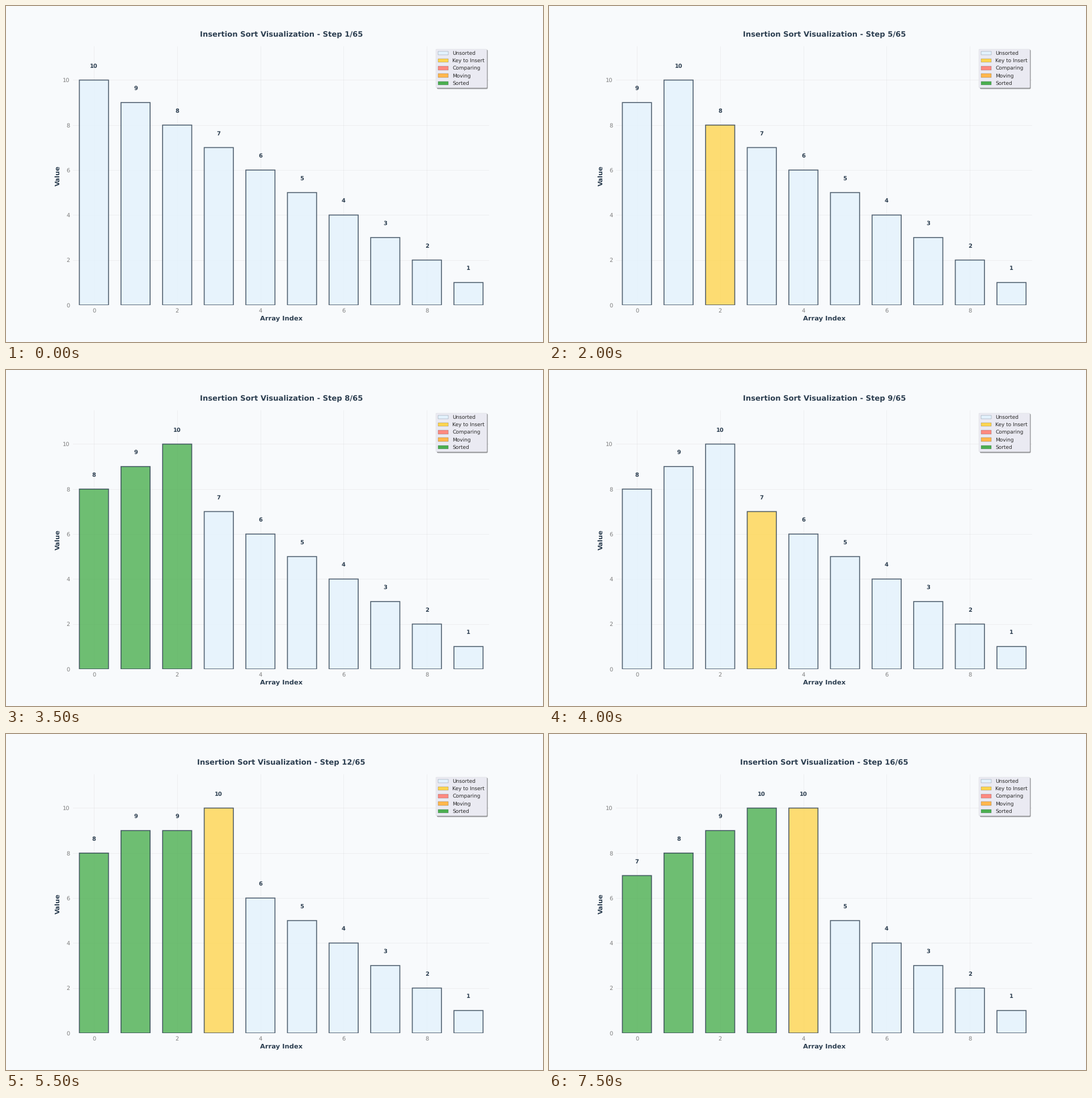
A matplotlib script for the animation above (8 s loop, 947 by 592 pixels).

```python
from itertools import islice

import matplotlib.pyplot as plt
from matplotlib.animation import FuncAnimation
from matplotlib.patches import Patch

W, H = 947, 592
DPI = W / 16
FRAMES, INTERVAL, TOTAL = 16, 500, 65

BG, INK, GRAY = "#F8FAFC", "#2C3E50", "#808080"
COLORS = {
    "Unsorted": "#E3F2FD",
    "Key to Insert": "#FFD54F",
    "Comparing": "#FF8A80",
    "Moving": "#FFB74D",
    "Sorted": "#4CAF50",
}

plt.rcParams.update({
    "font.family": "DejaVu Sans",
    "text.hinting": "none",
    "patch.linewidth": 0.3,
    "axes.axisbelow": True,
})


def insertion_steps(values):
    """Yield (values, states) for every visible step of the sort."""
    a = list(values)
    n = len(a)

    def snap(done=0, **marked):
        states = ["Sorted" if k < done else "Unsorted" for k in range(n)]
        if marked:
            states[marked["at"]] = marked["state"]
        return a[:], states

    yield snap()
    for i in range(1, n):
        key, j = a[i], i - 1
        yield snap(at=i, state="Key to Insert")
        yield snap(i, at=i, state="Moving")
        while j >= 0 and a[j] > key:
            a[j + 1] = a[j]
            j -= 1
            if j >= 0 and a[j] > key:
                yield snap(i, at=i, state="Key to Insert")
        a[j + 1] = key
        yield snap(i + 1)
    yield snap(n)


steps = list(islice(insertion_steps(range(10, 0, -1)), FRAMES))

# The tiny surplus keeps the pixel height from truncating to 591.
fig, ax = plt.subplots(figsize=(16, (H + 1e-6) / DPI), dpi=DPI, facecolor=BG)
ax.set_facecolor(BG)
ax.set_xlim(-0.5, 9.5)
ax.set_ylim(0, 11.5)
ax.set_xticks(range(0, 10, 2))
ax.set_yticks(range(0, 11, 2))
ax.tick_params(length=0, pad=7, labelsize=12, labelcolor=GRAY)
ax.grid(True, color="#CCCCCC", alpha=0.3, linewidth=1)
ax.spines[:].set_visible(False)
ax.set_xlabel("Array Index", fontsize=14, fontweight="bold", color=INK)
ax.set_ylabel("Value", fontsize=14, fontweight="bold", color=INK)
title = ax.set_title("", fontsize=16, fontweight="bold", color=INK, pad=20)

bars = ax.bar(range(10), steps[0][0], width=0.7, edgecolor=INK,
              linewidth=2, alpha=0.8, snap=False)
labels = [ax.text(k, 0, "", ha="center", va="bottom", fontsize=12,
                  fontweight="bold", color=INK) for k in range(10)]

ax.legend(
    handles=[Patch(facecolor=c, edgecolor=INK, label=name)
             for name, c in COLORS.items()],
    loc="upper right", fontsize=11, frameon=True, fancybox=True, shadow=True,
    framealpha=1, facecolor="#EAEAF2", edgecolor="0.8", labelcolor="0.15",
)


def draw(frame):
    values, states = steps[frame]
    for bar, label, value, state in zip(bars, labels, values, states):
        bar.set_height(value)
        bar.set_facecolor(COLORS[state])
        label.set_text(str(value))
        label.set_y(value + 0.5)
    title.set_text(f"Insertion Sort Visualization - Step {frame + 1}/{TOTAL}")
    return [*bars, *labels, title]


anim = FuncAnimation(fig, draw, frames=FRAMES, interval=INTERVAL,
                     repeat=True, repeat_delay=0, blit=False)
plt.show()
```
